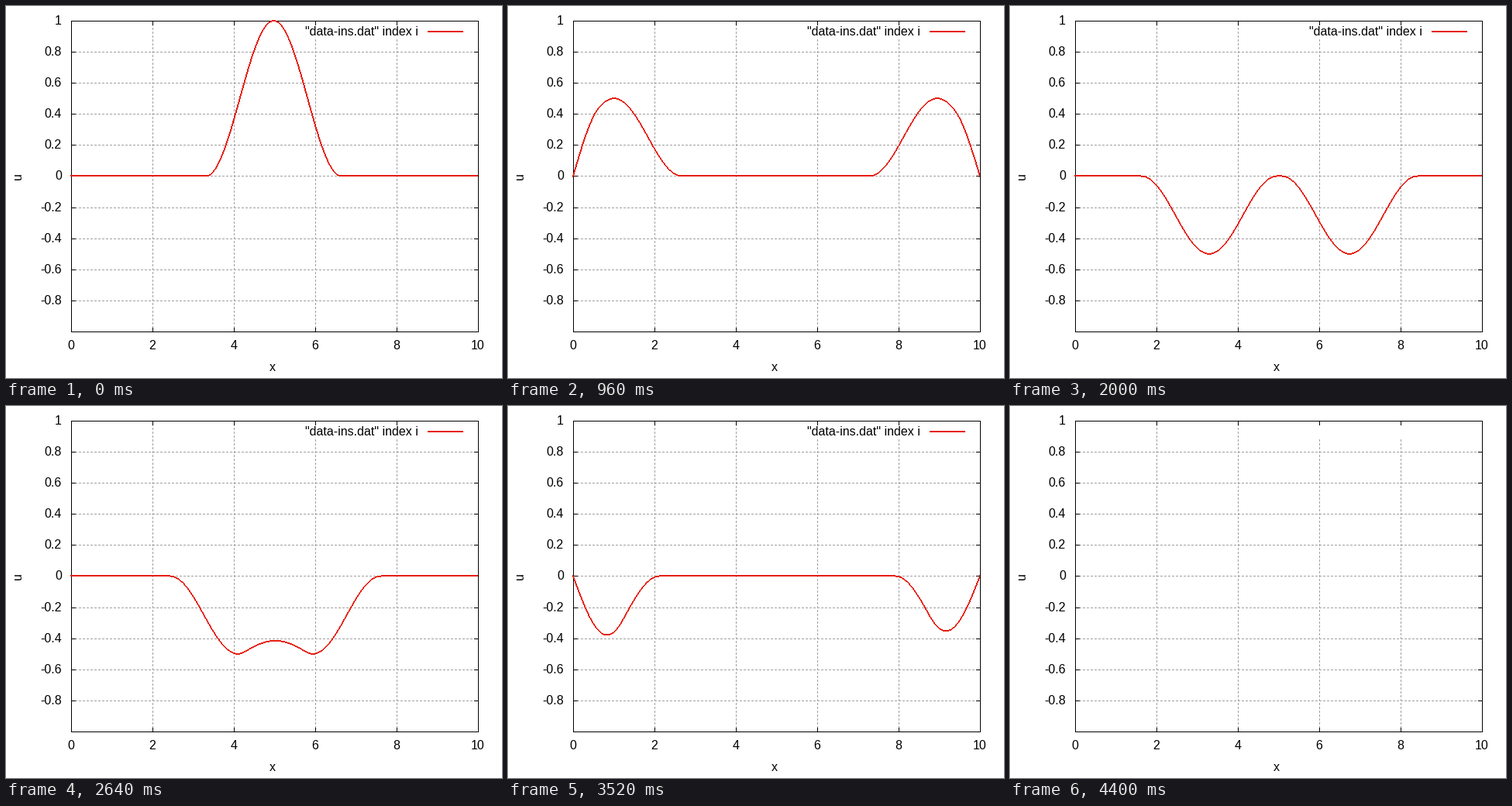
Recreate the animation shown at these times as a matplotlib script. Size 640x480 px, loop 4480 ms.

```python
import numpy as np
import matplotlib.pyplot as plt
from matplotlib.animation import FuncAnimation
from matplotlib.patches import Rectangle

plt.rcParams["font.family"] = "Liberation Sans"

DPI = 80
PX = 72 / DPI                      # one pixel in points
LEFT, RIGHT, TOP, BOTTOM = 84, 609, 19, 420
RED, GREY = "#e51e10", "#a0a0a0"
FRAMES, STEP_MS = 56, 80

LENGTH = 10.0
CENTER, HALF = 4.98, 5 / 3         # initial bump
SPEED = 0.331                      # distance per frame

FONT_PX = 16
ADVANCE = {".": 0.278, "-": 0.333}  # in em, digits are 0.556

fig = plt.figure(figsize=(640 / DPI, 480 / DPI), dpi=DPI, facecolor="white")
ax = fig.add_axes([0, 0, 1, 1])
ax.set_xlim(0, 640)
ax.set_ylim(480, 0)
ax.axis("off")


def to_px(x):
    return LEFT + x * (RIGHT - LEFT) / LENGTH


def to_py(u):
    return TOP + (1 - u) * (BOTTOM - TOP) / 2


def stroke(xs, ys, color="black", width=1, z=3, **kw):
    line, = ax.plot(xs, ys, color=color, lw=width * PX, zorder=z,
                    antialiased=False, snap=False, solid_capstyle="butt",
                    dash_capstyle="butt", **kw)
    return line


def label(x, y, text, **kw):
    return ax.text(x, y, text, va="baseline", fontsize=FONT_PX * PX,
                   color="black", zorder=4, **kw)


def number(x, y, value, align):
    """Place a number by its advance width: align 0.5 centres, 1 is right."""
    text = f"{value:g}"
    width = FONT_PX * sum(ADVANCE.get(c, 0.556) for c in text)
    label(x - align * width, y, text, ha="left")


def draw_axes():
    dots = dict(color=GREY, z=1, linestyle=(0, (2, 2)))
    tick = 5
    for x in range(0, 11, 2):
        p = to_px(x) + 0.5
        if 0 < x < 10:
            stroke([p, p], [BOTTOM + 1, TOP], **dots)
        stroke([p, p], [BOTTOM + 1, BOTTOM - tick])
        stroke([p, p], [TOP, TOP + tick + 1])
        number(to_px(x), 443, x, 0.5)
    for k in range(5, -5, -1):
        row = np.ceil(to_py(k / 5) - 0.5)
        p = row + 0.5
        if k < 5:
            stroke([LEFT, RIGHT], [p, p], **dots)
        stroke([LEFT, LEFT + tick + 1], [p, p])
        stroke([RIGHT + 1, RIGHT - tick], [p, p])
        number(72, row + 5, k / 5, 1)

    # blank area behind the legend
    ax.add_patch(Rectangle((380, TOP + 1), 220, 22, fc="white", ec="none",
                           zorder=2))
    l, r, t, b = LEFT + 0.5, RIGHT + 0.5, TOP + 0.5, BOTTOM + 0.5
    stroke([l, r, r, l, l], [t, t, b, b, t], solid_joinstyle="miter")
    label(344, 471, "x", ha="center")
    label(20, 220, "u", ha="center", rotation=90, rotation_mode="anchor")


def bump(x):
    """Raised cosine, extended oddly about both fixed ends."""
    def pulse(d):
        d = (d + LENGTH) % (2 * LENGTH) - LENGTH
        return np.where(np.abs(d) < HALF, 0.5 + 0.5 * np.cos(np.pi * d / HALF), 0)
    return pulse(x - CENTER) - pulse(x + CENTER)


def wave(x, shift):
    return (bump(x - shift) + bump(x + shift)) / 2


edges = np.arange(LEFT - 1, RIGHT + 1)
xs = np.clip((edges[:-1] + 0.5 - LEFT) * LENGTH / (RIGHT - LEFT), 0, LENGTH)


def band(i):
    """Upper and lower pixel edge of a two-pixel line in every column."""
    y = to_py(wave(xs, SPEED * i))
    reach = np.maximum(1, np.abs(np.gradient(y)))
    return np.ceil(y - 0.5 - reach), np.ceil(y - 0.5 + reach)


draw_axes()
upper, lower = band(0)
curve = ax.stairs(upper, edges, baseline=lower, fill=True, color=RED, lw=0,
                  antialiased=False, snap=False, zorder=5)
ax.set_xlim(0, 640)
ax.set_ylim(480, 0)
key_line = stroke([544, 590], [33, 33], RED, 2, z=5)
key_text = label(532, 38, '"data-ins.dat" index i', ha="right")
series = (curve, key_line, key_text)


def update(i):
    upper, lower = band(i)
    curve.set_data(upper, edges, lower)
    for artist in series:
        artist.set_visible(i < FRAMES - 1)   # the last step has no data
    return series


anim = FuncAnimation(fig, update, frames=FRAMES, interval=STEP_MS,
                     repeat=True, repeat_delay=0, blit=False)
plt.show()
```
